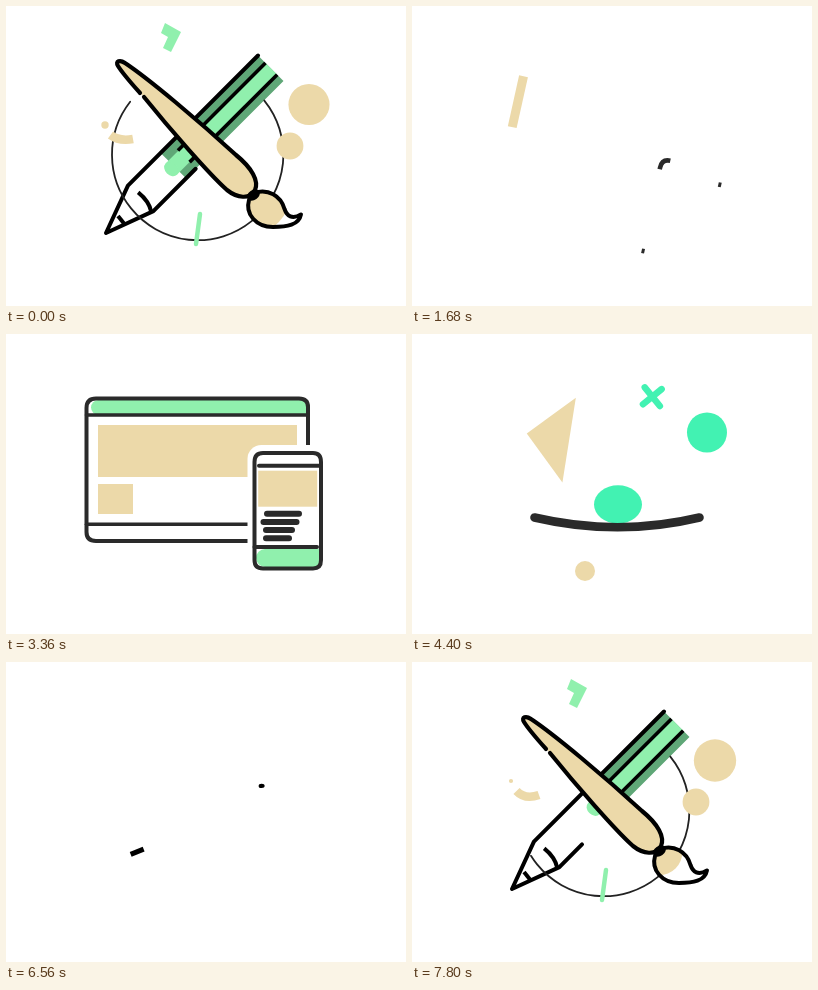
Animation of 400x300 px, one loop 7840 ms. Source, as an HTML page with a canvas:

```html
<!DOCTYPE html>
<html lang="en">
<head>
<meta charset="utf-8">
<title>Design tools, screens and motion</title>
<style>
html, body { margin: 0; width: 100%; height: 100%; overflow: hidden; background: #fff; }
canvas { display: block; width: 400px; height: 300px; }
</style>
</head>
<body>
<canvas id="stage" width="400" height="300"></canvas>
<script>
const ctx = document.getElementById('stage').getContext('2d');
const LOOP = 7840, STEP = 40, TAU = Math.PI * 2, RAD = Math.PI / 180;
const SAND = '#ecd9a9', MINT = '#90f0ad', LEAF = '#5fa777', TEAL = '#42f2b2';
const INK = '#000', COAL = '#2a2a2a';

// ---- helpers ----
const mix = (a, b, p) => a + (b - a) * p;
const ramp = (t, a, b) => Math.min(1, Math.max(0, (t - a) / (b - a)));
const smooth = p => p * p * (3 - 2 * p);
const ease = (t, a, b) => smooth(ramp(t, a, b));
const left = (t, end, n) => Math.pow(1 - ramp(t, 0, end), n);

function shape(d) {
  const el = document.createElementNS('http://www.w3.org/2000/svg', 'path');
  el.setAttribute('d', d);
  return { path: new Path2D(d), len: el.getTotalLength() };
}

function group(draw, x = 0, y = 0, deg = 0, scale = 1) {
  ctx.save();
  ctx.translate(x, y);
  ctx.rotate(deg * RAD);
  ctx.scale(scale, scale);
  draw();
  ctx.restore();
}

function turn(deg, x, y, draw) {
  group(() => { ctx.translate(-x, -y); draw(); }, x, y, deg);
}

function pen(color, width, cap = 'round') {
  ctx.strokeStyle = color;
  ctx.lineWidth = width;
  ctx.lineCap = cap;
  ctx.lineJoin = 'round';
}

// strokes the part of a shape between fractions a and b
function trace(s, a, b) {
  if (b <= a) return;
  ctx.save();
  ctx.setLineDash([(b - a) * s.len, s.len * 2]);
  ctx.lineDashOffset = -a * s.len;
  ctx.stroke(s.path);
  ctx.restore();
}

function line(x1, y1, x2, y2) {
  ctx.beginPath();
  ctx.moveTo(x1, y1);
  ctx.lineTo(x2, y2);
  ctx.stroke();
}

function rect(color, x, y, w, h) {
  ctx.fillStyle = color;
  ctx.fillRect(x, y, w, h);
}

function oval(color, x, y, rx, ry = rx, tilt = 0) {
  if (rx <= 0) return;
  ctx.fillStyle = color;
  ctx.beginPath();
  ctx.ellipse(x, y, rx, ry, tilt * RAD, 0, TAU);
  ctx.fill();
}

function poly(color, pts) {
  ctx.fillStyle = color;
  ctx.beginPath();
  pts.forEach(([x, y]) => ctx.lineTo(x, y));
  ctx.fill();
}

// ---- pencil and brush ----
const pencilEdge = shape('M234 18 H49 L0 0 L49 -18 H233');
const pencilBody = new Path2D('M233 -18 H49 Q58 -12 52 -6 Q60 1 52 7 Q56 13 49 18 H233 Z');
const handle = shape('M134 87 C126 78 117 68 112 60 C109 55 114 53.5 119 57 ' +
  'C143 73 193 115 230 149 C246 162 253 175 249 184 C244 194 231 192 221 184 ' +
  'C203 168 163 122 138 91');
const bristle = shape('M243 194 C239 208 250 221 267 221 C281 221 293 219 295 208.5 ' +
  'C286 214 281 210 278.5 203 C275 190 262 182 248 187');

function pencil(t) {
  const end = mix(234, 49, ramp(t, 1200, 1520));
  if (t > 1200) {
    ctx.save();
    ctx.clip(pencilBody);
    rect(LEAF, end, -18, 236 - end, 37);
    rect(MINT, end - 4, -7, 240 - end, 16);
    oval(MINT, end - 4, 1, 6, 8);
    pen(INK, 3.6, 'butt');
    line(end + 14, -7.5, 234, -7.5);
    line(end + 14, 9, 234, 9);
    ctx.restore();
  }
  const back = t < 1400 ? mix(63, 81, ramp(t, 160, 1400)) : mix(81, 234, ramp(t, 1400, 1620));
  const ahead = 185 + 289.4 * ease(t, 200, 1250);
  if (t > 60) {
    pen(INK, mix(5, 4, ramp(t, 160, 900)), t < 300 ? 'butt' : 'round');
    trace(pencilEdge, (234 - back) / pencilEdge.len, ahead / pencilEdge.len);
  }
  if (t > 1250) {
    pen(INK, 4, 'butt');
    ctx.beginPath();
    ctx.moveTo(51.5, -6);
    ctx.quadraticCurveTo(53, 8, 47, 17);
    ctx.stroke();
    line(20.5, -3.5, 19.5, 6);
  }
}

function brush(t) {
  const g = ease(t, 160, 1200);
  if (g > 0) {
    ctx.save();
    ctx.clip(handle.path);
    oval(SAND, 247, 188, 195 * g);
    ctx.restore();
    pen(INK, 4.2);
    trace(handle, 0.56 * (1 - g), 0.56 + 0.44 * g);
  }
  if (t > 700) {
    ctx.fillStyle = '#fff';
    if (t > 1200) ctx.fill(bristle.path);
    ctx.save();
    ctx.clip(bristle.path);
    oval(SAND, 247, 190, mix(0, 60, ramp(t, 1330, 1510)));
    ctx.restore();
    pen(INK, 4);
    trace(bristle, 0, ease(t, 700, 1300));
  }
  const grow = ramp(t, 160, 700);
  if (t > 60) oval(INK, 247.5, 189, mix(3, 7, grow), mix(2.2, 5, grow), mix(57, -35, grow));
}

function pop(t, start, peak, rest, top, low) {
  return t < peak ? top * ease(t, start, peak) : mix(top, low, ease(t, peak, rest));
}

function tools(t) {
  const settle = left(t, 1300, 3);
  const sway = t > 1440 ? 5 * Math.sin((t - 1440) / 210) * (1 - ramp(t, 1440, 2760)) : 0;

  turn(34 * settle, 192 - 6.5 * settle, 149 + 13.5 * settle, () => {
    ctx.translate(-6.5 * settle, 13.5 * settle);
    group(() => pencil(t), 100, 227, -45);
  });

  const arc = mix(-39, 218, ramp(t, 1293, 1440));
  if (arc > -39) {
    pen('#222', 1.8);
    ctx.beginPath();
    ctx.arc(191.7, 148.5, 85.7, -39 * RAD, arc * RAD);
    ctx.stroke();
  }

  oval(SAND, 303, 98.5, pop(t, 1160, 1390, 1640, 21.2, 15));
  oval(SAND, 284, 140, pop(t, 1050, 1280, 1300, 13.5, 13.4) - Math.abs(sway) * 0.2);
  oval(SAND, 99, 119, pop(t, 1320, 1500, 1700, 5, 2));

  const show = ramp(t, 1100, 1320);
  if (show > 0) {
    turn(sway, 165, 31, () => {
      group(() => poly(MINT, [[-6, -14], [10, -5], [0, 15], [-8, 11], [-3, 0], [-10, -4]]),
        165, 31, 0, show);
    });
    turn(sway, 192, 223, () => {
      pen(MINT, 4.5);
      line(mix(190, 194, show), mix(238, 208, show), 190, 238);
    });
  }
  if (show === 1) {
    pen(SAND, 8.5, 'butt');
    ctx.beginPath();
    ctx.moveTo(104.5, 129);
    ctx.quadraticCurveTo(113, mix(138, 135.5, ramp(t, 1400, 1440)), 127, 133);
    ctx.stroke();
  }

  turn(-85 * settle, 192, 149, () => brush(t));
}

// ---- browser and phone ----
const frame = shape('M302 120 V73 Q302 64.5 293 64.5 H90 Q80.5 64.5 80.5 74 V198 Q80.5 207 90 207 H302');
const phoneFrame = shape('M257 119 Q248.5 119 248.5 128 V226 Q248.5 234.5 257 234.5 ' +
  'H307 Q315 234.5 315 226 V128 Q315 119 307 119 H257');

function slab(color, x1, x2, y1, y2, r) {
  ctx.fillStyle = color;
  ctx.beginPath();
  ctx.roundRect(x1, y1, x2 - x1, y2 - y1, r);
  ctx.fill();
}

function browser(t) {
  const g = ramp(t, 260, 920);
  if (g > 0) {
    const edge = mix(300, 85, smooth(g));
    slab(MINT, edge, 301, 66, 81, [8, 8, 0, 8]);
  }
  const wide = t < 160 ? 9 * ramp(t, 60, 160) : mix(9, 199, ease(t, 160, 760));
  rect(SAND, 92, 91, wide, 52);
  rect(SAND, 92, 150, 35 * ease(t, 500, 900), 30);
  if (t < 200) return;
  pen(COAL, 4);
  const end = t < 920 ? 0.823 * ease(t, 200, 920) : mix(0.823, 1, ease(t, 920, 1400));
  trace(frame, 0, end);
  pen(COAL, 3.6);
  if (t > 480) {
    line(t < 920 ? mix(302, 130, ease(t, 480, 920)) : mix(130, 80.5, ease(t, 920, 1200)), 81, 302, 81);
    line(80.5, 190.3, t < 920 ? mix(81, 204, ease(t, 480, 920)) : mix(204, 302, ease(t, 920, 1300)), 190.3);
  }
}

function phone(t) {
  const body = ease(t, 160, 900);
  if (t > 240) slab('#fff', 241.5, 322, 111, 242, 14);
  if (t > 400) {
    const tilt = t < 920 ? mix(20, 6, ease(t, 400, 920)) : 6 * (1 - ease(t, 920, 1400));
    group(() => rect(SAND, -29.5, -18, 59, 36), 281.7, 154.7, tilt, ease(t, 400, 800));
    const fill = t < 920 ? mix(313, 257, ease(t, 560, 920)) : mix(257, 250, ease(t, 920, 1080));
    if (t > 560) slab(MINT, fill, 313, 215, 233, [9, 0, 4, 9]);
  }
  pen(COAL, 6);
  [[261, 293], [257.5, 290.5], [260, 286], [260, 283]].forEach(([a, b], i) => {
    const g = ease(t, 520 + i * 50, 760 + i * 50);
    if (g > 0) line(a, 179.7 + i * 8.2, mix(a, b, g), 179.7 + i * 8.2);
  });
  pen(COAL, mix(4.6, 4, body), t < 300 ? 'butt' : 'round');
  if (t > 60) {
    trace(phoneFrame, 0, t < 920 ? mix(0.045, 0.968, body) : mix(0.968, 1, ease(t, 920, 1100)));
    line(mix(309, 253, body), 131.7, mix(312, 314, body), 131.7);
    line(248.5, 213, mix(251.5, 311, body), 213);
  }
}

function screens(t) {
  turn(17.9 * left(t, 1880, 4), 198, 149, () => {
    const slide = left(t, 900, 3);
    browser(t);
    group(() => phone(t), 2 * slide, 40.5 * slide);
  });
}

// ---- bouncing ball ----
function bounce(t) {
  const wave = Math.cos((t - 400) / 2400 * TAU);
  const beat = ((t - 400) % 600 + 600) % 600 / 600;
  const hop = 4 * beat * (1 - beat);
  const press = Math.max(0, 1 - hop * 3);

  const leg = 41 * (1.24 + 0.24 * wave);
  group(() => poly(SAND, [[-1, 1], [-1, -2], [2, 1]].map(([x, y]) => [x * leg / 3, y * leg / 3])),
    143, 88.5 + 15.5 * wave, 54 * (1 - (t - 400) / 1200));

  group(() => {
    pen(TEAL, 6.5);
    line(-12, 0, 12, 0);
    line(0, -12, 0, 12);
  }, 240.3, 62.7, 51 - (t - 400) * 0.05);

  oval(TEAL, 295, 98.5, 20 - 2.5 * hop);
  oval(SAND, 173 + (t - 400) * 28 / 1200, 237, 10);
  oval(TEAL, 206, 170.5 - 72 * hop, 21 + 3 * press, 21 - 1.8 * press);

  pen(COAL, 8.6);
  ctx.beginPath();
  ctx.moveTo(122.5, 183.5);
  ctx.quadraticCurveTo(206, mix(193, 203, press), 287.5, 183.5);
  ctx.stroke();
}

// ---- timeline ----
function render(ms) {
  ctx.clearRect(0, 0, 400, 300);
  if (ms < 1520) tools(ms + LOOP - 6400);
  else if (ms < 4000) screens(ms - 1520);
  else if (ms < 6400) bounce(ms - 4000);
  else tools(ms - 6400);
}

const begin = performance.now();
function tick() {
  const ms = (performance.now() - begin) % LOOP;
  render(Math.floor(ms / STEP) * STEP);
  requestAnimationFrame(tick);
}
tick();
</script>
</body>
</html>
```
